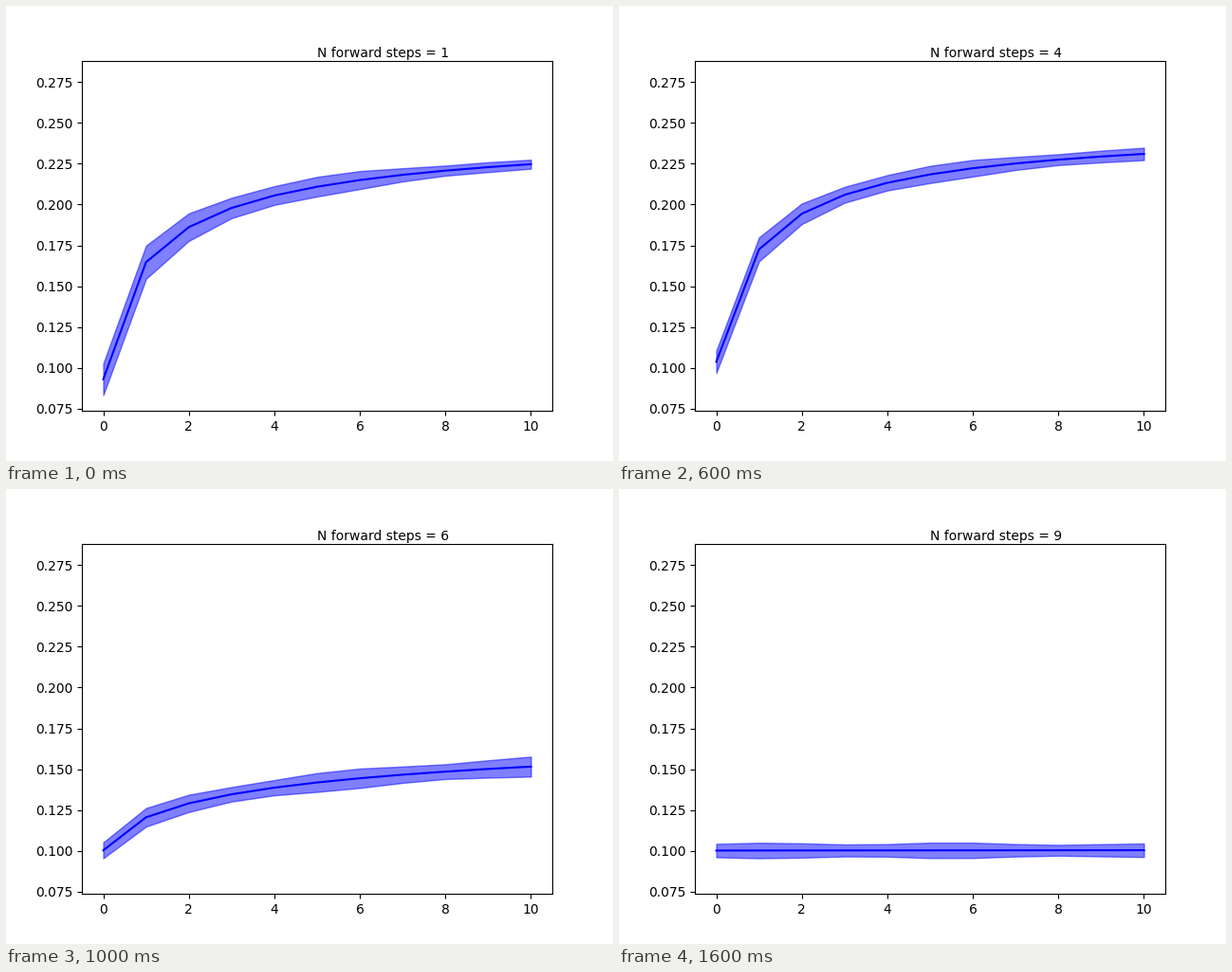
Recreate the animation shown at these times as a matplotlib script. Size 640 by 480 pixels, loop 1800 ms.

```python
import matplotlib.pyplot as plt
import numpy as np
from matplotlib.animation import ArtistAnimation

x = np.arange(11)


def curve(start, end, knee, power, *widths):
    """Saturating rise, with a rippled band given by its half width at x = 0, 5, 10."""
    rise = x**power / (x**power + knee)
    mean = start + (end - start) * rise / rise[-1]
    ripple = 1 + 0.15 * np.sin(2 * np.pi * x / 4.5)
    return mean, np.interp(x, [0, 5, 10], widths) * ripple


def blend(first, second, gain, spread):
    """Average two curves, scaling the rise and the band."""
    mean = (first[0] + second[0]) / 2
    half = (first[1] + second[1]) / 2
    return mean[0] + gain * (mean - mean[0]), spread * half


curves = {
    1: curve(0.0930, 0.2247, 1.18, 0.8, 0.0097, 0.0055, 0.0024),
    2: curve(0.1085, 0.2422, 0.61, 0.6, 0.0080, 0.0023, 0.0040),
    4: curve(0.1037, 0.2310, 1.13, 0.87, 0.0068, 0.0048, 0.0033),
    5: curve(0.0991, 0.1855, 1.98, 0.8, 0.0033, 0.0030, 0.0037),
    7: curve(0.1016, 0.1177, 20, 1, 0.0032, 0.0040, 0.0034),
    9: curve(0.1002, 0.1004, 20, 1, 0.0041, 0.0043, 0.0036),
}
curves[3] = blend(curves[2], curves[4], 1.26, 2.05)
curves[6] = blend(curves[5], curves[7], 1.0, 1.5)
curves[8] = blend(curves[7], curves[9], 1.0, 1.35)

fig, ax = plt.subplots(figsize=(6.4, 4.8), dpi=100)
ax.set_xlim(-0.5, 10.5)
ax.set_ylim(0.07363, 0.28813)

scenes = []
for n, (mean, half) in sorted(curves.items()):
    line, = ax.plot(x, mean, color="blue")
    band = ax.fill_between(x, mean - half, mean + half, color="blue", alpha=0.5)
    label = ax.text(5, 0.29, f"N forward steps = {n}")
    scenes.append([line, band, label])

anim = ArtistAnimation(fig, scenes, interval=200, repeat=True, repeat_delay=0)
plt.show()
```
